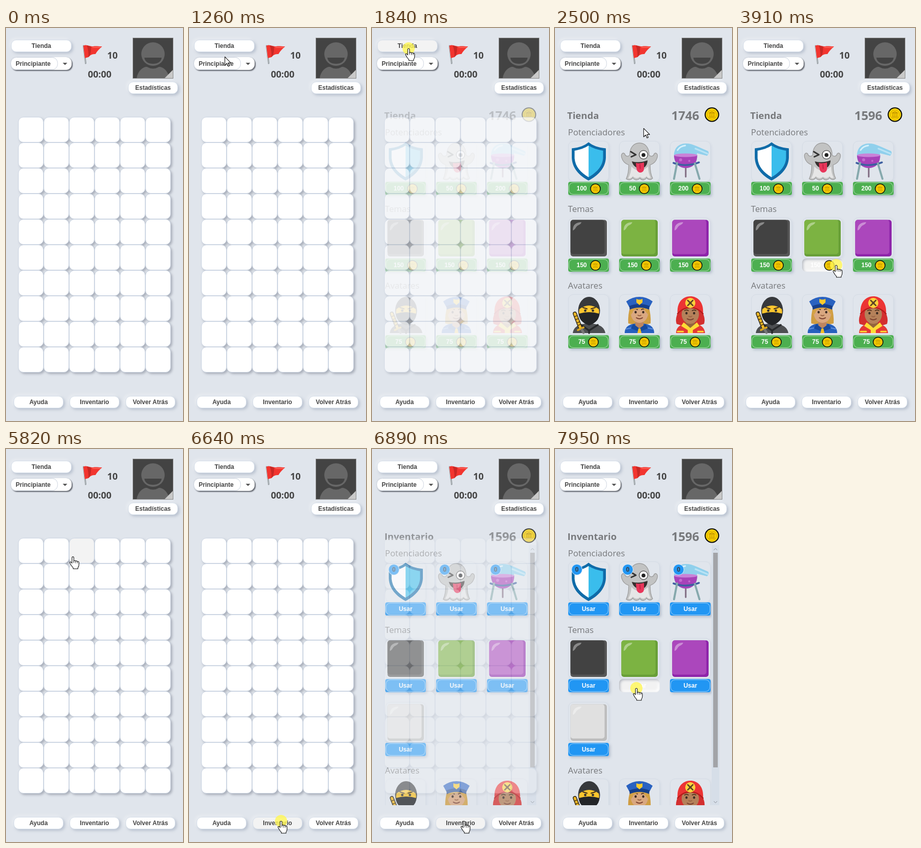
Recreate the animation shown at these times as an HTML page. Size 348 by 769 pixels, loop 8000 ms.

```html
<!DOCTYPE html>
<html lang="es">
<head>
<meta charset="utf-8">
<title>Buscaminas</title>
<style>
html, body { margin: 0; width: 100%; height: 100%; overflow: hidden; background: #e0e5ec; }
#stage { position: relative; width: 348px; height: 769px; overflow: hidden; }
#stage div, #stage svg { position: absolute; box-sizing: border-box; }
.layer { left: 0; top: 0; width: 348px; height: 769px; }
.btn, .act, .pick { font: bold 12px/22px "Liberation Sans", Arial, sans-serif; text-align: center; }
.btn { background: #fff; color: #444; border: 1px solid #d6dfea; border-radius: 10px;
  box-shadow: 3px 3px 5px rgba(150,162,182,.5), -3px -3px 6px rgba(255,255,255,.3); }
.btn.hot, .cell.hot { background: #f3f3f3; }
.pick { background: #fff; color: #444; border-radius: 11px; text-align: left; line-height: 25px;
  box-shadow: 2px 2px 2px #666a72, 0 0 1px #8f98a6; }
.cell { background: #fff; border: 1px solid #cfd8e5; border-radius: 10px; box-shadow: 3px 3px 4px rgba(125,132,145,.55); }
.tile { border: 1px solid #d5dce5; border-radius: 10px; box-shadow: 2px 2px 4px rgba(163,177,198,.2); }
.act { color: #fff; line-height: 26px; border-radius: 4px; display: flex; justify-content: center; align-items: center; gap: 6px;
  box-shadow: 3px 3px 5px rgba(150,162,182,.55); }
.act svg { position: static !important; }
.act::after { content: ""; position: absolute; inset: 1px; border: 1px solid rgba(255,255,255,.55); border-radius: 9px; }
.buy { background: #4caf50; }
.use { background: #2196f3; }
.act.hot { background: #f2f2f2; border-radius: 8px; box-shadow: inset 2px 2px 5px #b4b8c0, inset -3px -3px 5px #fff; }
.act.hot::after { border-color: transparent; }
.txt { font-family: "Open Sans", "Noto Sans", sans-serif; line-height: 30px; height: 30px; white-space: nowrap; color: #77797c; }
.bold { font-weight: bold; }
.badge { background: #2196f3; border: 1px solid #d9ebfa; border-radius: 50%; color: #3c444c; text-align: center;
  font: bold 12px/20px "Open Sans", sans-serif; }
#dot { width: 24px; height: 24px; border-radius: 50%; background: rgba(255,246,84,.8); }
</style>
</head>
<body>
<div id="stage"></div>
<script>
const stage = document.getElementById('stage');
const hot = [];

function add(parent, cls, x, y, w, h, html = '') {
  const el = document.createElement('div');
  el.className = cls;
  el.style.cssText = `left:${x}px;top:${y}px;width:${w}px;height:${h}px`;
  el.innerHTML = html;
  parent.append(el);
  return el;
}
function addHot(layer, cls, x, y, w, h, html) {
  hot.push({ el: add(layer, cls, x, y, w, h, html), layer, x, y, w, h });
}
function text(parent, x, cy, size, str, cls = '', color = '') {
  const el = add(parent, 'txt ' + cls, x, cy - 15, 150, 30, str);
  el.style.fontSize = size + 'px';
  el.style.color = color;
  return el;
}
const svg = (w, h, body, box = `0 0 ${w} ${h}`) =>
  `<svg width="${w}" height="${h}" viewBox="${box}" style="overflow:visible">${body}</svg>`;
const path = (d, fill, extra = '') => `<path d="${d}" fill="${fill}" ${extra}/>`;
const line = (d, color, w) => path(d, 'none', `stroke="${color}" stroke-width="${w}" stroke-linecap="round" stroke-linejoin="round"`);
const disc = (x, y, r, fill, ry = r) => `<ellipse cx="${x}" cy="${y}" rx="${r}" ry="${ry}" fill="${fill}"/>`;
const rect = (x, y, w, h, r, fill) => `<rect x="${x}" y="${y}" width="${w}" height="${h}" rx="${r}" fill="${fill}"/>`;

const coin = s => svg(s, s,
  disc(15, 15, 14.8, '#0c0b06') + disc(15, 15, 12.6, '#ffdc0a') + disc(15, 15, 10.4, '#d9a800') + disc(15, 15, 9.2, '#f7cd00') +
  line('M9.5 12H20.5L15 9ZM9.5 20H20.5M11 14V18M15 14V18M19 14V18', '#bd9000', 1.3), '0 0 30 30');

const block = (main, edge) => rect(4.5, 4.5, 71.5, 71.5, 5, edge) + rect(4.5, 4.5, 67, 67, 5, main) +
  path('M9 25C9 14 15 9 26 9C25 13 21 14 18 16C14 19 14 24 9 25Z', '#fff', 'opacity=".38"');

const face = (skin, y) => disc(40, y, 17, skin, 19) +
  line(`M29 ${y - 7}q3-2.5 7 0M44 ${y - 7}q3-2.5 7 0`, '#5a3a24', 2) +
  disc(32.5, y - 2, 2.2, '#3a2a22', 2.6) + disc(47.5, y - 2, 2.2, '#3a2a22', 2.6) +
  line(`M34 ${y + 9}q6 4 12 0`, '#7a4030', 2) + line(`M37 ${y + 4}q3 2 6 0`, '#9b6545', 2);

const icons = {
  shield: path('M40 2.5C32 9 22 13 7 14.5V33C8 54 22 68 40 77.500C58 68 73 54 74 33V14.500C59 13 48 9 40 2.500Z', '#0f6ba8') +
    path('M40 9C32 14 24 17 12.500 19V34C14 51 25 62 40 71Z', '#fff') +
    path('M40 9C48 14 57 17 68.500 19V34C67 51 55 62 40 71Z', '#3abdec'),
  ghost: path('M40 4C52 4 59 14 59 27C62 32 68 30 69 25C72 22 77 25 75 32C73 40 67 45 61 47C61 58 63 68 66 73C62 77 57 76 54 72C51 77 45 78 41 73C36 78 30 77 27 72C23 77 18 77 14 74C18 66 19 57 19 47C13 45 7 40 5 32C3 25 8 22 11 25C12 30 18 32 21 27C21 14 28 4 40 4Z',
      '#c2c3c3', 'stroke="#9d9d9d" stroke-width="1.3"') +
    path('M24 50Q40 66 57 50Q57 62 62 72Q57 74 54 69Q48 76 41 70Q34 76 27 69Q24 74 18 73Q24 62 24 50Z', '#e6e6e6') +
    line('M23 21L33 27L24 31', '#333', 3) + disc(48, 27, 9, '#444') + disc(48, 27, 7.8, '#fff') + disc(48, 27.5, 3.8, '#222') +
    path('M25 40Q40 44 56 38Q55 53 42 54Q29 53 25 40Z', '#37302f') +
    path('M33 43Q40 45 49 42L49 55Q48 62 41 62Q35 61 34 53Z', '#e8365a') + line('M41 46L41.5 54', '#b71c3c', 1.5),
  flask: line('M31 50V70', '#7e6a80', 3) +
    path('M8 29C8 13 18 5 32 5C45 5 58 13 75 20Q78 25 73 29L53 24C56 40 46 53 31 53C16 53 8 41 8 29Z', '#90d0ec') +
    path('M8 28H53.500C54 43 45 53 31 53C17 53 8 42 8 28Z', '#a743b9') + disc(31, 28, 22.7, '#c983d8', 3.500) +
    line('M7 43Q31 52 57 42', '#3d5fa0', 3.500) + line('M14 43L8 74M49 44L58 74', '#86a9ad', 4) +
    line('M15 18Q20 10 30 9', '#d5f0fb', 3) + line('M50 15L74 25', '#b9e3f5', 3) +
    disc(21, 37, 3, '#c46ad0') + disc(38, 39, 2, '#c46ad0'),
  ninja: path('M9 76C10 63 24 57 40 57C58 57 71 63 73 76Z', '#4d4f52') + disc(41, 32, 21.5, '#37393c', 27) +
    path('M22 29Q41 15 60 29Q62 38 59 40Q41 34 23 40Q20 38 22 29Z', '#fcc62e') +
    line('M29 26l8 2.500M53 26l-8 2.500', '#41301d', 2.200) + disc(33.500, 32, 2.400, '#333') + disc(48.500, 32, 2.400, '#333') +
    path('M21 38Q41 32 61 38Q61 54 41 61Q21 54 21 38Z', '#232528') + line('M25 60L41 71L58 60M41 71V76', '#27292b', 3.500) +
    line('M13 38L24 66', '#2b271d', 8) + line('M13 38L24 66', '#f2b927', 5) +
    line('M12 44l5-2M14 50l5-2M17 56l5-2M19 61l5-2', '#4f3b14', 1.500) + line('M19 70L30 65', '#d8a521', 4) + line('M27 70L30 75', '#777', 5),
  police: path('M22 24Q17 40 18 57Q40 64 62 57Q63 40 58 24Z', '#cf9d42') + path('M11 76C11 62 22 57 40 57C58 57 69 62 69 76Z', '#2660be') +
    path('M32 52H48V62L40 69L32 62Z', '#bd8660') + face('#d9a780', 37) +
    path('M21 42Q20 24 40 24Q60 24 59 42Q52 34 48 28Q32 28 28 32Q26 38 21 42Z', '#d5a246') +
    path('M20 25L14 14Q26 5 40 5Q54 5 66 14L60 25Q40 16 20 25Z', '#2a62c0') +
    path('M20 23Q40 15 60 23L59 30Q40 22 21 30Z', '#163f8a') + path('M34 9Q40 12 46 9V16L40 21L34 16Z', '#fcca2c') +
    path('M28 58L40 67L52 58L57 67L43 72L40 76L37 72L23 67Z', '#174a9d') + path('M38 67H42L44 76H36Z', '#f4be25') +
    line('M14 68L23 66M57 66L66 68', '#5f8fdc', 2),
  fire: path('M13 58Q9 46 19 30H61Q71 46 67 58Q40 68 13 58Z', '#d32f2f') +
    path('M12 76C12 63 23 57 40 57C57 57 68 63 69 76Z', '#e53935') +
    path('M31 53H49V61L40 69L31 61Z', '#94643c') + face('#b5815a', 39) +
    path('M15 38C13 16 25 4 40 4C55 4 67 16 65 38Q54 26 40 26Q26 26 15 38Z', '#ec3434') +
    line('M15 38Q26 26 40 26Q54 26 65 38', '#b71c1c', 2.500) + disc(40, 17, 10, '#fdd33b') +
    line('M35 12L45 22M45 12L35 22', '#5d4326', 2.600) + disc(40, 17, 2.500, '#5d4326') +
    path('M27 55L40 66L53 55L58 62L45 70V76H35V70L22 62Z', '#fddb35') + line('M15 73h11M55 73h10', '#fddb35', 3),
  dark: block('#424242', '#565656'),
  green: block('#7cb342', '#689f38'),
  purple: block('#ab47bc', '#8e24aa'),
  light: block('#e0e0e0', '#bdbdbd')
};

function card(layer, icon, x, y, cls, label) {
  add(layer, 'tile', x, y, 80, 80);
  add(layer, '', x, y, 80, 80, svg(80, 80, icons[icon]));
  addHot(layer, 'act ' + cls, x, y + 80, 80, 26, label);
}
const price = n => `<span>${n}</span>${coin(21)}`;
function heading(layer, x, title) {
  text(layer, x, 171, 18.5, title, 'bold');
  add(layer, '', 293.5, 154.5, 29, 29, coin(29));
  const sum = text(layer, 133.5, 170.5, 24, '', 'bold');
  sum.style.textAlign = 'right';
  return sum;
}

// shop and inventory lie under the board
const shop = add(stage, 'layer', 0, 0, 348, 769);
const bag = add(stage, 'layer', 0, 0, 348, 769);
const board = add(stage, 'layer', 0, 0, 348, 769);
const bars = add(stage, 'layer', 0, 0, 348, 769);
bag.style.clipPath = 'inset(0 0 72px 0)';

const groups = [
  ['Potenciadores', ['shield', 'ghost', 'flask'], [100, 50, 200], 0],
  ['Temas', ['dark', 'green', 'purple'], [150, 150, 150], 0],
  ['Avatares', ['ninja', 'police', 'fire'], [75, 75, 75], 125]
];
const money = heading(shop, 24, 'Tienda');
heading(bag, 24.5, 'Inventario').textContent = '1596';
groups.forEach(([name, list, costs, shift], g) => {
  const y = 221 + 150 * g;
  text(shop, 25.6, y - 17.5, 16.8, name);
  text(bag, 25.6, y - 17.5 + shift, 16.8, name);
  list.forEach((icon, i) => {
    const x = 26 + 100 * i;
    card(shop, icon, x, y, 'buy', price(costs[i]));
    card(bag, icon, x, y - 1 + shift, 'use', 'Usar');
    if (!g) add(bag, 'badge', x + 6, 225, 22, 22, '0');
  });
});
card(bag, 'light', 26, 495, 'use', 'Usar');
add(bag, '', 308, 188, 15, 509).style.background = '#d6dee8';
add(bag, '', 311, 203, 9, 420).style.background = '#a2a4a8';
add(bag, '', 308, 188, 15, 509, svg(15, 509, line('M4.5 9.5L7.5 6.5L10.5 9.5M4.5 501.5L7.5 504.5L10.5 501.5', '#878d96', 1)));

for (let i = 0; i < 60; i++) addHot(board, 'cell', 24 + 50 * (i % 6), 174 + 50 * (i / 6 | 0), 50, 50);

// fixed controls
addHot(bars, 'btn', 10, 23, 119, 24, 'Tienda');
addHot(bars, 'btn', 240, 105, 98, 24, 'Estadísticas');
['Ayuda', 'Inventario', 'Volver Atrás'].forEach((s, i) => addHot(bars, 'btn', 15 + 110 * i, 720, 98, 24, s));
const pick = add(bars, 'pick', 9, 57, 120, 25, svg(120, 25,
  `<rect x=".5" y=".5" width="92" height="24" rx="11" fill="none" stroke="#ccd4df"/>` + path('M102.5 11H111.5L107 15.5Z', '#555')));
add(pick, '', 10, 1, 80, 25, 'Principiante');
text(bars, 199, 53, 18, '10', 'bold', '#444');
text(bars, 161, 90, 18, '00:00', 'bold', '#444');
add(bars, '', 148, 28, 44, 46, svg(44, 46,
  line('M4.5 7L8.500 41', '#8d9499', 3) + line('M4.2 7L8 41', '#c5cbce', 1.2) +
  path('M4 7C11 3 16 9 23 8C29 7 33 8 41 8C35 14 31 17 28 23C22 23 18 24 14 29L7 31Z', '#f2352f') +
  path('M14 29Q15 19 11 6Q16 8 19 8Q20 16 17 26Z', '#c92824') + line('M22 10Q30 10 38 10', '#ff6a5e', 1.5)));
add(bars, '', 249, 19, 80, 80, svg(80, 80,
  rect(0, 0, 80, 80, 0, '#8a8a8a') + rect(1, 1, 78, 78, 0, '#434343') +
  disc(40, 32, 23, '#676767') + path('M23 39H57Q55 51 40 51Q25 51 23 39Z', '#434343') +
  path('M8 79C10 64 22 56 28 57Q40 64 52 57C60 57 70 65 72 79Z', '#676767') +
  path('M63 79L79 63V79Z', '#c9c9c9')));

// pointer
const dot = add(stage, '', 0, 0, 24, 24);
dot.id = 'dot';
const ink = 'stroke="#111" stroke-width="1.1" stroke-linejoin="round"';
const arrow = add(stage, '', 0, 0, 1, 1, svg(1, 1,
  path('M.5 .5V17L4.5 13.3L7.1 19.2L9.5 18.2L7 12.4H12.3Z', '#fff', ink)));
const hand = add(stage, '', 0, 0, 1, 1, svg(1, 1,
  path('M-1.8 2Q-1.8 .2 0 .2T1.8 2V9Q2.3 7.5 3.8 7.7T5.5 9.1Q6 8.1 7.4 8.3T8.9 9.9Q9.7 9.1 10.8 9.6T11.8 11.6V16Q11.8 19 9.8 21.5V23.8H.5V21.8Q-3 18.5-5.6 13Q-6.6 11-5.2 10.4-3.6 9.9-1.8 12.8Z', '#fff', ink) +
  line('M1.8 9V12M5.5 9.5V12.5M8.9 10V12.5', '#111', .9)));

const route = [
  [400, 327, 745], [490, 300, 690], [650, 228, 495], [820, 165, 320], [1000, 115, 165], [1180, 77, 70],
  [1260, 70, 56], [1430, 72, 40], [2300, 72, 40], [2500, 173.5, 195], [2680, 232, 370], [2830, 246, 460],
  [3080, 193, 464], [4680, 193, 464], [4900, 160, 330], [5070, 115, 165], [5230, 86.5, 57.5], [5400, 72, 40],
  [5580, 72, 40], [5820, 131.5, 209.5], [6060, 150, 480], [6310, 167, 688], [6390, 172, 715], [6500, 181, 728],
  [7150, 181, 728], [7400, 172, 650], [7640, 162, 515], [7800, 160, 468], [8000, 160, 468]
];
const clicks = [[1720, 2050], [3120, 3950], [5520, 5640], [6590, 6840], [7910, 8000]];

function place(t) {
  const i = Math.max(1, route.findIndex(p => p[0] >= t));
  const [a, b] = [route[i - 1], route[i]];
  const k = Math.min(1, Math.max(0, (t - a[0]) / (b[0] - a[0])));
  return [a[1] + (b[1] - a[1]) * k, a[2] + (b[2] - a[2]) * k];
}
const ramp = (t, start) => Math.min(1, Math.max(0, (t - start) / 310));
function fade(el, v) {
  el.style.opacity = v;
  el.style.visibility = v > 0 ? 'visible' : 'hidden';
}
function move(el, x, y, on) {
  el.style.transform = `translate(${x}px,${y}px)`;
  el.style.visibility = on ? 'visible' : 'hidden';
}

function draw(t) {
  const shopOn = ramp(t, 1730) - ramp(t, 5500), bagOn = ramp(t, 6660);
  const level = new Map([[shop, shopOn], [bag, bagOn], [board, 1 - shopOn - bagOn]]);
  level.forEach((v, el) => fade(el, v));
  money.textContent = t < 3905 ? '1746' : '1596';
  const seen = t >= 400, [x, y] = place(t);
  let over = false;
  for (const h of hot) {
    const live = h.layer === bars || level.get(h.layer) > .5;
    const hit = seen && live && x >= h.x && x < h.x + h.w && y >= h.y && y < h.y + h.h;
    h.el.classList.toggle('hot', hit);
    over = over || hit;
  }
  move(arrow, x, y, seen && !over);
  move(hand, x, y, seen && over);
  move(dot, x - 12, y - 12, clicks.some(([a, b]) => t >= a && t < b));
}

const start = performance.now();
function tick() {
  draw((performance.now() - start) % 8000);
  requestAnimationFrame(tick);
}
tick();
</script>
</body>
</html>
```
